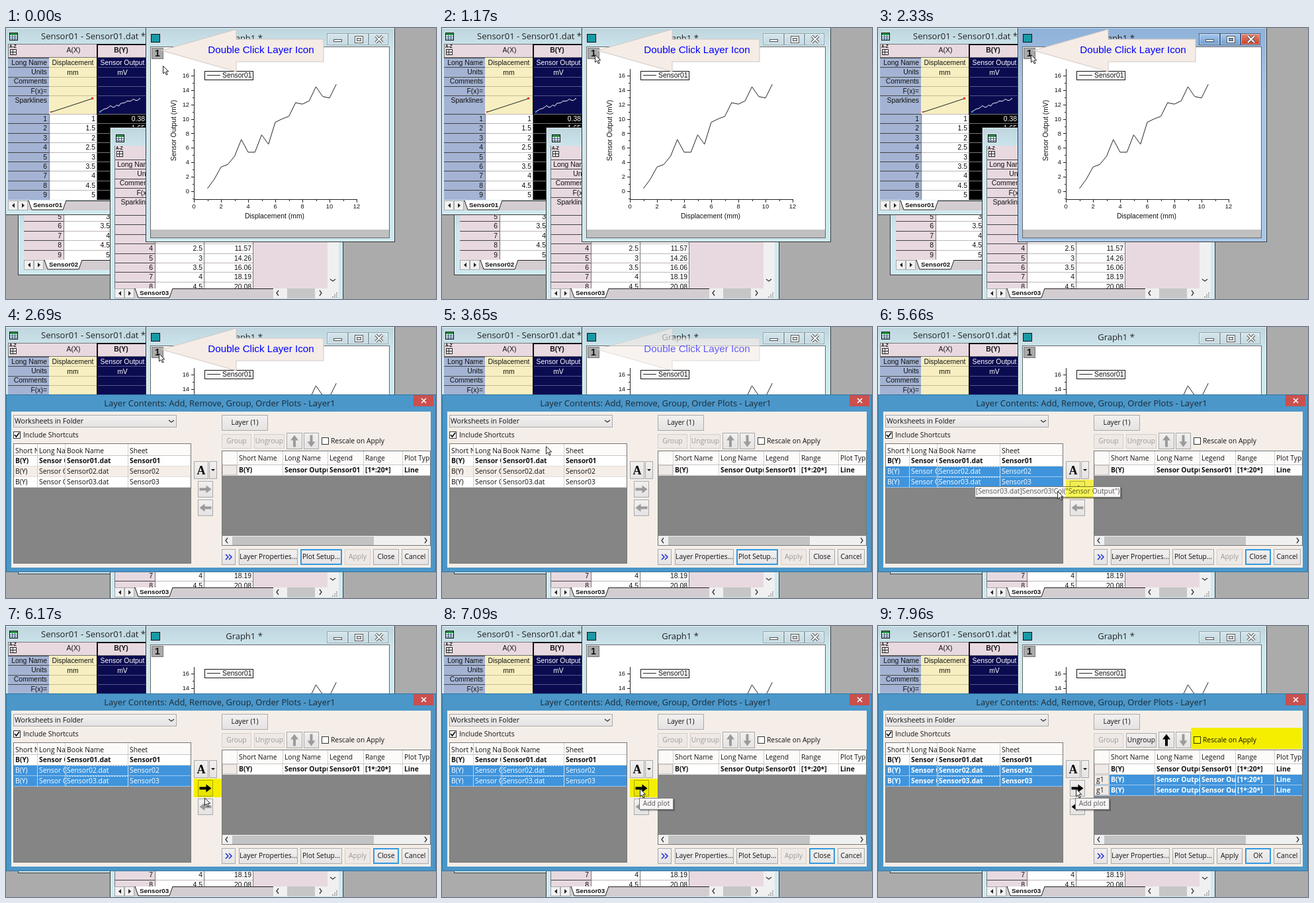
These frames come from a looping animation (650x410 px, 8 s). An HTML page with a canvas:

```html
<!DOCTYPE html>
<html>
<head>
<meta charset="utf-8">
<style>
html, body { margin: 0; width: 100%; height: 100%; overflow: hidden; background: #ababab; }
canvas { display: block; }
</style>
</head>
<body>
<canvas id="stage" width="650" height="410"></canvas>
<script>
const c = document.getElementById('stage').getContext('2d');
const LOOP = 8000;
const UI = '10.3px "Open Sans", sans-serif', UIB = 'bold ' + UI;
const TITLE = '13px "Open Sans", sans-serif';
const CELL = '10.4px "Liberation Sans", sans-serif', CELLB = 'bold ' + CELL;
const PINK = '#e8d9e0', BLUE = '#3f94dc', GRID = '#c0b6bb', FACE = '#f5eee8', EMPTY = '#858585';
const OUTPUT = [.38, 1.65, 3.35, 3.7, 4.85, 7.15, 5.4, 5.4, 7.8, 6.5, 9.55, 10, 10.35, 12.25, 12.05, 12.5, 14.45, 13.1, 12.9, 14.8];

const ramp = (t, a, b) => Math.max(0, Math.min(1, (t - a) / (b - a)));

function box(x, y, w, h, fill, edge, line = 1) {
  if (fill) { c.fillStyle = fill; c.fillRect(x, y, w, h); }
  if (edge) { c.strokeStyle = edge; c.lineWidth = line; c.strokeRect(x + line / 2, y + line / 2, w - line, h - line); }
}
function text(s, x, y, font = UI, color = '#111', align = 'left') {
  c.font = font; c.fillStyle = color; c.textAlign = align; c.textBaseline = 'middle';
  c.fillText(s, x, y);
}
function path(points, stroke, width = 1, fill, close) {
  c.beginPath();
  points.forEach(([x, y]) => c.lineTo(x, y));
  if (close) c.closePath();
  if (fill) { c.fillStyle = fill; c.fill(); }
  if (stroke) { c.strokeStyle = stroke; c.lineWidth = width; c.stroke(); }
}
function shade(y, h, from, to) {
  const g = c.createLinearGradient(0, y, 0, y + h);
  g.addColorStop(0, from); g.addColorStop(1, to);
  return g;
}
const hline = (x1, x2, y, col) => box(x1, y, x2 - x1, 1, col);
const vline = (x, y1, y2, col) => box(x, y1, 1, y2 - y1, col);
function clipped(s, x, w, y, font, color) {
  c.save(); c.beginPath(); c.rect(x, y - 9, w, 18); c.clip();
  text(s, x + 2, y, font, color);
  c.restore();
}
function chevron(x, y, dx, dy, col = '#333') {
  path([[x - dx - dy * 4, y - dy - dx * 4], [x + dx * 2, y + dy * 2], [x - dx + dy * 4, y - dy + dx * 4]], col, 1.3);
}
function frame(x, y, w, h, active) {
  const fill = active ? shade(y, 100, '#8fb1d8', '#a8c8ea') : shade(y, 40, '#bfd5dd', '#cfe9f0');
  box(x, y, w, h, fill, '#333');
  box(x + 1, y + 1, w - 2, h - 2, null, active ? '#bcd9f4' : '#dcf4fa');
}

// Worksheet windows
function sheetIcon(x, y) {
  box(x, y, 13, 12, '#fff', '#111');
  box(x + 1, y + 1, 11, 3, '#2c9a4a');
  for (let i = 0; i < 2; i++) { hline(x + 1, x + 12, y + 6 + i * 3, '#357'); vline(x + 4 + i * 4, y + 4, y + 11, '#357'); }
}
function cornerIcon(x, y) {
  text('A-Z', x, y, 'bold 6.5px "Liberation Sans", sans-serif');
  box(x + 1, y + 4, 10, 9, '#fff', '#222');
  hline(x + 1, x + 11, y + 8, '#222'); vline(x + 5, y + 4, y + 13, '#222');
}
function tabBar(x, y, w, name) {
  box(x, y, w, 15, '#d3ccd0');
  hline(x, x + w, y, '#222');
  for (let i = 0; i < 2; i++) {
    const bx = x + i * 15, m = bx + 8, d = i ? 2 : -2;
    box(bx, y, 15, 15, '#f1f1f1', '#aaa');
    path([[m - d, y + 4], [m + d, y + 7.5], [m - d, y + 11]], null, 0, '#222', true);
  }
  path([[x + 31, y], [x + 36, y + 14], [x + 83, y + 14], [x + 88, y]], '#222', 1, '#fff');
  text(name, x + 38, y + 7, 'bold 9.8px "Liberation Sans", sans-serif');
}
function gridRows(x, y, n, first, edges, columns, labelFill, dark) {
  for (let i = 0; i < n; i++) {
    const top = Math.round(y + i * 14.4), mid = top + 8;
    box(x, top, edges[0] - x, 15, labelFill);
    text(first + i, edges[0] - 3, mid, CELL, '#111', 'right');
    columns.forEach((col, k) => {
      const black = dark && k;
      box(edges[k], top, edges[k + 1] - edges[k], 15, black ? '#000' : '#fff');
      hline(edges[k], edges[k + 1], top, black ? '#777' : GRID);
      if (col[i] != null) text(col[i], edges[k + 1] - 2, mid, CELL, black ? '#fff' : '#111', 'right');
    });
    hline(x, edges[0], top, '#444');
  }
  edges.forEach(e => vline(e, y, y + n * 14.4, '#777'));
}
function labelRows(x, right, y, fill) {
  ['Long Name', 'Units', 'Comments', 'F(x)=', 'Sparklines'].forEach((s, i) => {
    const top = y + i * 14.3;
    box(x, top, right - x, i == 4 ? 29 : 14.3, fill);
    hline(x, right, Math.round(top), '#444');
    text(s, right - 3, top + 8, CELL, '#111', 'right');
  });
}

function sensor02() {
  frame(18, 270, 200, 104);
  gridRows(27, 278, 5, 5, [87, 159], [[3, '3.5', 4, '4.5', 5]], PINK);
  tabBar(27, 351, 140, 'Sensor02');
}
function sensor01() {
  frame(-4, -1, 234, 284);
  sheetIcon(5, 7);
  text('Sensor01 - Sensor01.dat *', 211, 14, TITLE, '#222', 'right');
  box(3, 24, 227, 21, PINK, '#777');
  cornerIcon(5, 28);
  text('A(X)', 102, 34.5, CELL, '#111', 'center');
  text('B(Y)', 174, 34.5, CELLB, '#111', 'center');
  labelRows(3, 65, 45, '#a4b3d3');
  box(65, 45, 72, 86, '#f7efc1');
  box(137, 45, 75, 86, '#0b0b50');
  [[101, 'Displacement', 'mm', '#111'], [176, 'Sensor Output', 'mV', '#fff']].forEach(([x, name, unit, col]) => {
    text(name, x, 53.5, CELL, col, 'center');
    text(unit, x, 68, CELL, col, 'center');
  });
  [59, 74, 88, 102].forEach(y => { hline(65, 137, y, '#c5bd98'); hline(137, 212, y, '#55558a'); });
  path([[69, 127], [130, 107]], '#222');
  box(67, 126, 2, 2, '#e22'); box(129, 105, 3, 3, '#e22');
  path(OUTPUT.map((v, i) => [142 + i * 3.15, 127 - v * 1.35]), '#fff');
  box(141, 126, 2, 2, '#2cc'); box(201, 106, 2, 2, '#2cc');
  gridRows(3, 130, 9, 1, [65, 137, 212],
    [[1, '1.5', 2, '2.5', 3, '3.5', 4, '4.5', 5], ['0.38', '1.65']], '#a4b3d3', true);
  path([[138, 131], [138, 25], [212, 25]], '#111', 2);
  tabBar(3, 261, 220, 'Sensor01');
}
function sensor03() {
  frame(157, 150, 353, 270);
  sheetIcon(166, 161);
  box(164, 178, 322, 216, PINK);
  cornerIcon(166, 182);
  labelRows(164, 225, 199, PINK);
  gridRows(164, 283, 8, 1, [225, 299, 373],
    [[1, '1.5', 2, '2.5', 3, '3.5', 4, '4.5'], [, , , '11.57', '14.26', '16.06', '18.19', '20.08']], PINK);
  vline(164, 178, 394, '#777');
  box(486, 178, 17, 230, '#f0f0f0');
  chevron(494, 381, 0, 1);
  tabBar(164, 394, 240, 'Sensor03');
  box(404, 394, 99, 15, '#f0f0f0');
  box(425, 394, 42, 15, '#c6c6c6');
  chevron(411, 401, -1, 0); chevron(475, 401, 1, 0);
  for (let i = 0; i < 3; i++) for (let j = 0; j <= i; j++) box(499 - j * 3, 400 + i * 3, 2, 2, '#aaa');
}

function windowButtons(active) {
  const blue = ['#a9cbee', '#6a9bd0'], pale = ['#d6e6ec', '#c3d8e0'];
  [[485, 32], [517, 31], [548, 30]].forEach(([x, w], i) => {
    const tone = !active ? pale : i == 2 ? ['#e58a76', '#c43a22'] : blue;
    box(x, 8, w, 18, shade(8, 18, ...tone), active ? '#4a5f80' : '#93a5ac');
    box(x + 1, 9, w - 2, 16, null, 'rgba(255,255,255,.5)');
  });
  box(495, 17, 13, 4, '#fff', '#555');
  box(527, 12, 13, 11, '#fff', '#555'); box(530, 15, 7, 5, active ? blue[1] : pale[1], '#555');
  [['#555', 4], ['#fff', 2]].forEach(([col, w]) => {
    path([[559, 12], [569, 22]], col, w); path([[569, 12], [559, 22]], col, w);
  });
}
function graph(active) {
  frame(211, -1, 377, 325, active);
  box(219, 9, 14, 13, '#1a9aa5', '#111');
  text('Graph1 *', 360, 17, TITLE, '#222', 'center');
  windowButtons(active);
  box(218, 28, 362, 290, '#fff', '#666');
  box(219, 305, 360, 12, '#c0c0c0');
  box(220, 30, 18, 17, '#aaa', '#777');
  text('1', 229, 39, 'bold 14px "Liberation Sans", sans-serif', '#111', 'center');

  const px = v => 284 + v * 20.5, py = v => 247 - v * 10.94;
  const small = '9.3px "Liberation Sans", sans-serif';
  vline(284, 62, 260, '#222'); hline(284, 531, 259, '#222');
  for (let v = -1; v <= 16; v++) {
    hline(v % 2 ? 282 : 280, 284, Math.round(py(v)), '#222');
    if (v % 2 == 0) text(v, 277, py(v) + .5, small, '#111', 'right');
  }
  for (let v = 0; v <= 12; v++) {
    vline(Math.round(px(v)), 259, v % 2 ? 262 : 264, '#222');
    if (v % 2 == 0) text(v, px(v), 270, small, '#111', 'center');
  }
  path(OUTPUT.map((v, i) => [px(1 + i / 2), py(v)]), '#222');
  text('Displacement (mm)', 406, 285, CELL, '#111', 'center');
  c.save(); c.translate(254, 155); c.rotate(-Math.PI / 2);
  text('Sensor Output (mV)', 0, 0, CELL, '#111', 'center');
  c.restore();
  box(300, 65, 74, 14, '#fff', '#111');
  hline(304, 324, 71, '#222');
  text('Sensor01', 327, 72, CELL);
}

// Dialog
function button(x, y, w, h, label, on = true, focus = false) {
  box(x, y, w, h, on ? shade(y, h, '#f3f1f0', '#e4e2e2') : '#efe9e6', focus ? '#3399e0' : on ? '#a9a9a9' : '#d3cfcc', focus ? 2 : 1);
  if (label) text(label, x + w / 2, y + h / 2, UI, on ? '#111' : '#9a9a9a', 'center');
}
function arrowButton(x, y, w, h, angle, on) {
  button(x, y, w, h);
  c.save(); c.translate(x + w / 2, y + h / 2); c.rotate(angle);
  path([[-9, -2], [1, -2], [1, -6], [9, 0], [1, 6], [1, 2], [-9, 2]], null, 0, on ? '#000' : '#9b9b9b', true);
  c.restore();
}
function checkbox(x, y, ticked) {
  box(x, y, 11, 11, '#fff', '#333');
  if (ticked) path([[x + 2, y + 5], [x + 4.5, y + 8], [x + 9, y + 2]], '#111', 1.8);
}
function table(edges, top, rowY, heads, rows) {
  const left = edges[0], right = edges[edges.length - 1];
  box(left, top, right - left, rowY - top, '#fdfbfa');
  heads.forEach((s, i) => clipped(s, edges[i], edges[i + 1] - edges[i], top + 11));
  rows.forEach(({ cells, selected, bold, fill = '#fff' }, r) => {
    const y = rowY + r * 16;
    box(left, y, right - left, 16, selected ? BLUE : fill);
    cells.forEach((s, i) => clipped(s, edges[i], edges[i + 1] - edges[i] - 1, y + 8, bold ? UIB : UI, selected ? '#fff' : '#111'));
    hline(left, right, y + 15, selected ? '#9cc8ee' : '#e3dedb');
  });
  const end = rowY + rows.length * 16;
  edges.slice(1, -1).forEach(e => vline(e - 1, top, end, '#d2cecb'));
  hline(left, right, rowY - 1, '#c8c4c2');
}
function dialog(t) {
  const picked = t >= 4160, both = t >= 4620, added = t >= 7390;
  box(0, 102, 650, 269, '#4b97c9', '#35759f');
  text('Layer Contents: Add, Remove, Group, Order Plots - Layer1', 323, 117, TITLE, '#1c2a36', 'center');
  box(616, 103, 30, 17, '#c9504e');
  path([[628, 108], [635, 115]], '#fff', 1.6); path([[635, 108], [628, 115]], '#fff', 1.6);
  box(8, 128, 634, 236, FACE);

  button(11, 133, 247, 19);
  text('Worksheets in Folder', 13, 143, '10.6px "Open Sans", sans-serif');
  chevron(250, 142, 0, 1);
  checkbox(11, 158, true);
  text('Include Shortcuts', 26, 164);

  box(11, 176, 269, 182, EMPTY, '#777');
  const left = [1, 2, 3].map(n => ({
    cells: ['B(Y)', 'Sensor Output', `Sensor0${n}.dat`, `Sensor0${n}`],
    bold: n == 1 || added,
    selected: n == 2 && picked || n == 3 && both,
    fill: n == 2 ? '#f5eee8' : '#fff'
  }));
  table([12, 48, 90, 185, 279], 177, 195, ['Short Name', 'Long Name', 'Book Name', 'Sheet'], left);
  if (picked) {
    c.setLineDash([2, 2]);
    box(91, 211, 94, 16, null, '#d8ecff');
    if (both) box(91, 227, 94, 16, null, '#d8ecff');
    c.setLineDash([]);
  }

  button(284, 203, 22, 27);
  text('A', 295, 218, 'bold 18px "Liberation Serif", serif', '#000', 'center');
  button(307, 203, 12, 27);
  path([[310, 215], [316, 215], [313, 218]], null, 0, '#111', true);
  arrowButton(290, 233, 23, 25, 0, picked);
  arrowButton(290, 261, 23, 25, Math.PI, added);

  button(326, 133, 70, 24, 'Layer (1)');
  button(326, 162, 45, 22, 'Group', false);
  button(375, 162, 46, 22, 'Ungroup', added);
  arrowButton(424, 160, 24, 25, -Math.PI / 2, added);
  arrowButton(450, 160, 23, 25, Math.PI / 2, false);
  checkbox(477, 167);
  text('Rescale on Apply', 491, 173);

  box(326, 187, 316, 144, EMPTY, '#777');
  const plot = ['B(Y)', 'Sensor Output', 'Sensor01', '[1*:20*]', 'Line'];
  const right = [{ cells: ['', ...plot], bold: true }];
  if (added) for (let i = 0; i < 2; i++)
    right.push({ cells: ['', ...plot.map(s => s == 'Sensor01' ? 'Sensor Output' : s)], bold: true, selected: true });
  table([327, 350, 419, 487, 541, 600, 641], 188, 209, ['', 'Short Name', 'Long Name', 'Legend', 'Range', 'Plot Type'], right);
  right.forEach((r, i) => {
    box(327, 209 + i * 16, 22, 15, '#f0eae7', '#cbc7c5');
    if (i) clipped('g1', 328, 20, 217 + i * 16);
  });
  box(327, 316, 314, 14, '#f0f0f0');
  box(342, 317, 214, 13, '#c3c3c3');
  chevron(334, 323, -1, 0); chevron(634, 323, 1, 0);

  button(326, 336, 21, 24);
  [334, 339].forEach(x => path([[x - 2, 344], [x + 2, 348], [x - 2, 352]], '#1a2ce0', 1.5));
  button(352, 336, 89, 24, 'Layer Properties...');
  button(445, 336, 63, 24, 'Plot Setup...', true, !picked);
  button(512, 336, 39, 24, 'Apply', added);
  button(555, 336, 39, 24, added ? 'OK' : 'Close', true, picked);
  button(598, 336, 41, 24, 'Cancel');
}

// Overlays
function callout(alpha) {
  c.globalAlpha = alpha;
  path([[235, 34], [348, 2], [348, 17], [480, 17], [480, 51], [348, 51], [348, 66]], '#d0c8c4', 1, '#f5ece6', true);
  text('Double Click Layer Icon', 385.5, 34, '15.2px "Liberation Sans", sans-serif', '#00f', 'center');
  c.globalAlpha = 1;
}
function highlight(x, y, w, h, alpha) {
  c.save();
  c.globalAlpha = alpha; c.globalCompositeOperation = 'multiply';
  box(x, y, w, h, '#ff0');
  c.restore();
}
function tooltip(x, y, w, h, s, alpha = 1) {
  c.globalAlpha = alpha;
  box(x + 2, y + 2, w, h, 'rgba(0,0,0,.25)');
  box(x, y, w, h, '#f7f5f5', '#777');
  text(s, x + w / 2, y + h / 2, UI, '#575757', 'center');
  c.globalAlpha = 1;
}
// Cursor keys: time, x, y
const MOVES = [[0, 237, 57], [690, 237, 57], [970, 233, 40], [1169, 233, 40], [1170, 231, 40], [3350, 231, 40],
  [3480, 193, 118], [3650, 157, 180], [3900, 150, 208], [4130, 148, 219], [4400, 146, 228], [5150, 146, 228],
  [5400, 205, 238], [5660, 271, 248], [5930, 292, 260], [6120, 300, 262], [6450, 299, 246], [LOOP, 299, 246]];
function cursor(t) {
  const i = MOVES.findIndex(m => m[0] > t), [t0, x0, y0] = MOVES[i - 1], [t1, x1, y1] = MOVES[i];
  const k = ramp(t, t0, t1);
  c.save();
  c.translate(x0 + (x1 - x0) * k + .5, y0 + (y1 - y0) * k + .5);
  path([[0, 0], [0, 11.5], [2.8, 9], [4.8, 13.5], [6.6, 12.7], [4.7, 8.3], [8.2, 8.3]], '#222', 1, '#fff', true);
  c.restore();
}

function draw(t) {
  box(0, 0, 650, 410, '#ababab');
  sensor02(); sensor01(); sensor03(); graph(t >= 2330 && t < 2660);
  if (t >= 2660) {
    c.save();
    if (t < 2690) {
      // half-opened window, slightly smaller
      c.globalAlpha = .5;
      c.translate(325, 236); c.scale(.96, .96); c.translate(-325, -236);
    }
    dialog(t);
    c.restore();
  }
  const fade = 1 - ramp(t, 3320, 4200);
  if (fade > 0) callout(fade);
  if (t >= 5150 && t < 5990) tooltip(146, 241, 221, 17, '[Sensor03.dat]Sensor03!Col("Sensor Output")');
  highlight(284, 231, 42, 28, ramp(t, 5150, 5930) * (1 - ramp(t, 7390, 7900)));
  highlight(473, 154, 168, 32, ramp(t, 7420, 7960));
  if (t >= 6910) tooltip(298, 260, 52, 18, 'Add plot', ramp(t, 6880, 7090));
  cursor(t);
}
function tick() {
  draw(performance.now() % LOOP);
  requestAnimationFrame(tick);
}
tick();
</script>
</body>
</html>
```
